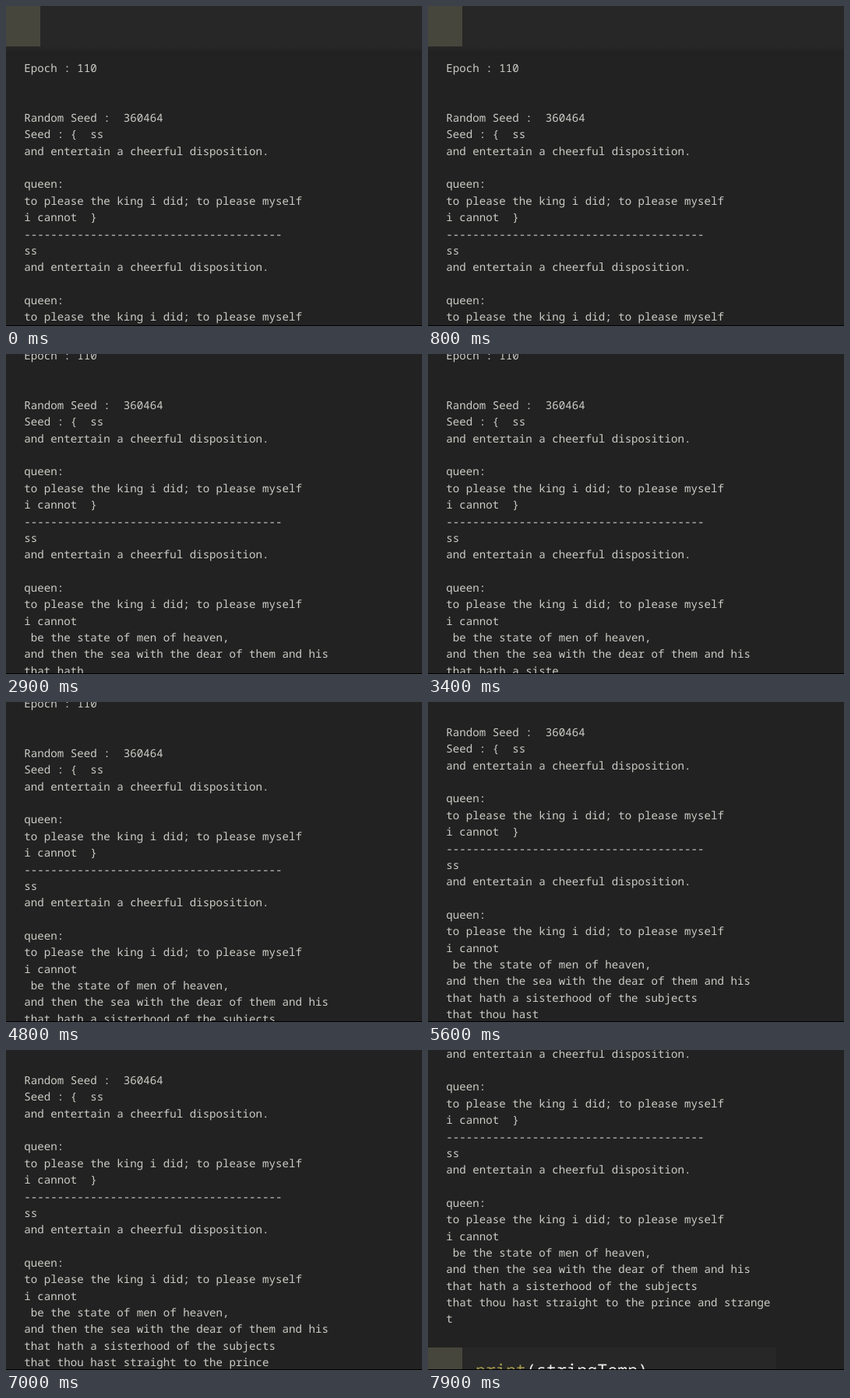
An HTML page that plays this animation: 534x412 px, repeating every 8000 ms.

```html
<!DOCTYPE html>
<html lang="en">
<head>
<meta charset="utf-8">
<title>Text generation log</title>
<style>
  html, body { margin: 0; width: 100%; height: 100%; overflow: hidden; background: #222; }
  svg { display: block; width: 534px; height: 412px; }
  text {
    font-family: "Noto Sans Mono", "DejaVu Sans Mono", monospace;
    white-space: pre;
    text-rendering: geometricPrecision;
  }
  #log { font-size: 14.16px; font-weight: 500; fill: #cbcbc6; }
  #code { font-size: 21.7px; fill: #eeeeea; }
</style>
</head>
<body>
<svg viewBox="0 0 534 412">
  <defs>
    <linearGradient id="shade" x2="0" y2="1">
      <stop offset="0" stop-color="#272727"/>
      <stop offset=".7" stop-color="#202020"/>
      <stop offset="1" stop-color="#222222"/>
    </linearGradient>
  </defs>
  <rect width="534" height="412" fill="#222222"/>
  <g id="page">
    <rect width="534" height="52" fill="#272727"/>
    <rect y="52" width="534" height="13" fill="url(#shade)"/>
    <rect width="44" height="52" fill="#46463c"/>
    <g id="log"></g>
    <g id="code">
      <rect y="565" width="447" height="60" fill="#272727"/>
      <rect y="565" width="44" height="60" fill="#46463c"/>
      <text x="61" y="602"><tspan fill="#a39a4c">print</tspan>(stringTemp)</text>
    </g>
  </g>
  <rect y="411" width="534" height="1" fill="#000"/>
</svg>
<script>
const LOOP = 8000, TICK = 100, KEY_TICK = 200;
const PITCH = 21.35, FIRST_BASELINE = 85;

const passage = [
  "and entertain a cheerful disposition.", "", "queen:",
  "to please the king i did; to please myself"
];
const lines = [
  "Epoch : 110", "", "", "Random Seed :  360464", "Seed : {  ss",
  ...passage, "i cannot  }", "-".repeat(39), "ss",
  ...passage, "i cannot",
  " be the state of men of heaven,",
  "and then the sea with the dear of them and his",
  "that hath a sisterhood of the subjects",
  "that thou hast straight to the prince and strange",
  "t"
];

const glides = [
  { start: 2255, span: 150, dist: 78 },
  { start: 5150, span: 250, dist: 27 },
  { start: 7555, span: 250, dist: 77 }
];

// A bend above 1 makes the typing slow down towards the line's end
const typing = [
  { row: 19, start: 2500, span: 2200, bend: 1.3 },
  { row: 20, start: 4800, span: 2900, bend: 1 },
  { row: 21, start: 7600, span: KEY_TICK, bend: 1 }
];

const page = document.getElementById("page");
const log = document.getElementById("log");

const rows = lines.map((line, i) => {
  const el = document.createElementNS("http://www.w3.org/2000/svg", "text");
  el.setAttribute("x", 23.3);
  el.setAttribute("y", Math.round(FIRST_BASELINE + i * PITCH));
  el.textContent = line;
  log.append(el);
  return el;
});

const clamp = u => Math.min(1, Math.max(0, u));
const smooth = u => u * u * (3 - 2 * u);
const snap = (t, step) => Math.floor(t / step) * step;

function scrollAt(t) {
  const total = glides.reduce(
    (sum, g) => sum + g.dist * smooth(clamp((t - g.start) / g.span)), 0);
  return Math.round(total);
}

function typed({ row, start, span, bend }, t) {
  const u = clamp(snap(t - start, KEY_TICK) / span);
  const count = Math.round(lines[row].length * (1 - (1 - u) ** bend));
  return lines[row].slice(0, count);
}

function draw(time) {
  const t = snap(time % LOOP, TICK);
  page.setAttribute("transform", `translate(0 ${-scrollAt(t)})`);
  for (const job of typing) rows[job.row].textContent = typed(job, t);
}

const begin = performance.now();
function loop() {
  draw(performance.now() - begin);
  requestAnimationFrame(loop);
}
loop();
</script>
</body>
</html>
```
